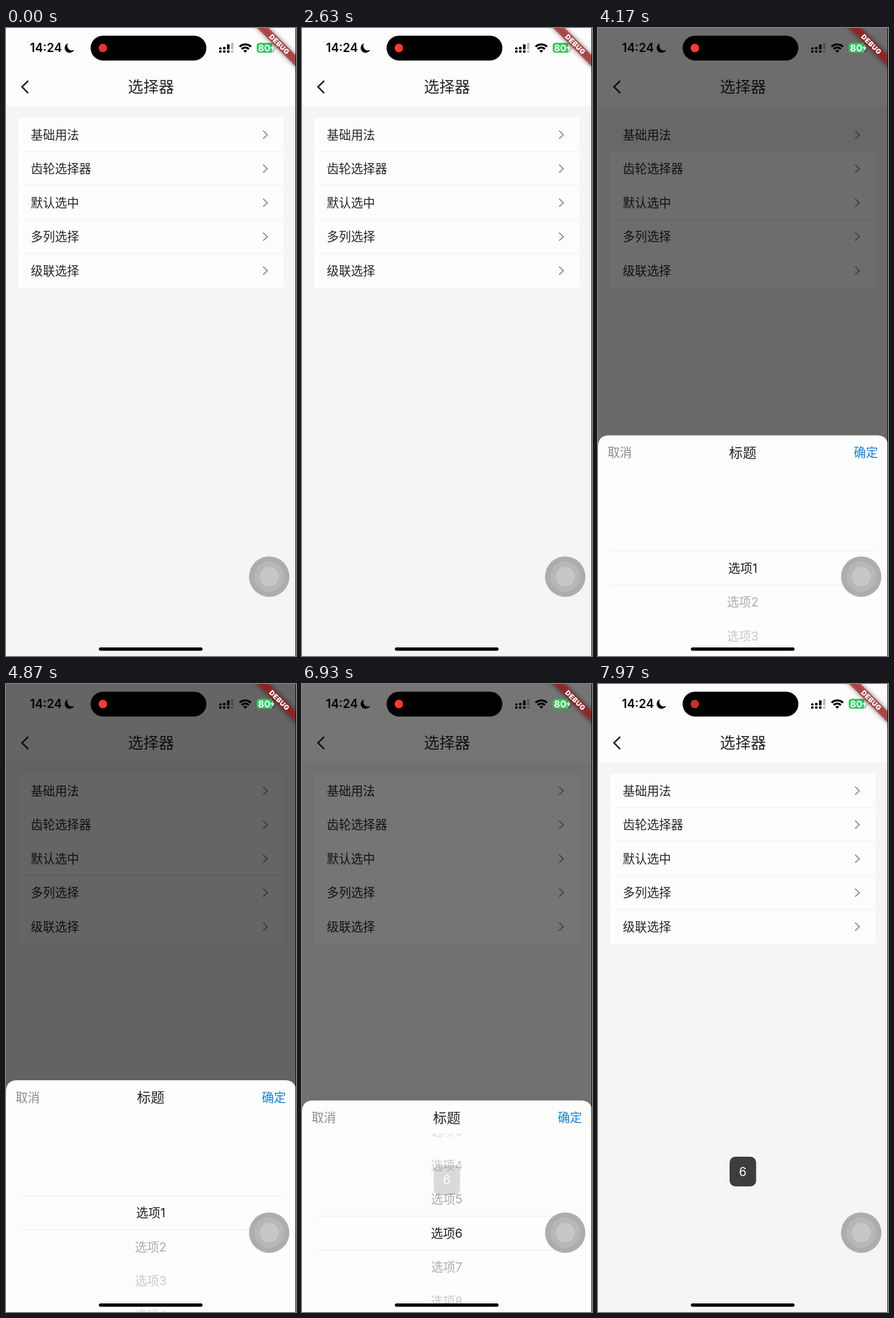
Animation of 509x1100 px, one loop 8000 ms. Source, as an HTML page:

```html
<!DOCTYPE html>
<html lang="zh-CN">
<head>
<meta charset="utf-8">
<title>选择器</title>
<style>
  html, body { margin: 0; width: 100%; height: 100%; overflow: hidden; background: #f4f5f6; }
  svg { display: block; width: 509px; height: 1100px; }
  text { font-family: Inter, "Noto Sans CJK SC", "Noto Sans CJK", sans-serif; font-size: 21.2px; fill: #262626; }
  .mid { text-anchor: middle; }
  .end { text-anchor: end; }
  .line { stroke: #ededf2; stroke-width: 1.2; }
  .chevron { fill: none; stroke: #8a8a96; stroke-width: 1.8; }
</style>
</head>
<body>
<svg viewBox="0 0 509 1100">
  <defs>
    <clipPath id="listClip"><rect y="58" width="509" height="348"/></clipPath>
    <filter id="soft" x="-20%" y="-200%" width="140%" height="500%"><feGaussianBlur stdDeviation="4.4"/></filter>
  </defs>

  <g id="page">
    <rect width="509" height="1100" fill="#f4f5f6"/>
    <rect width="509" height="136.5" fill="#fdfdfd"/>
    <path d="M39 92.5L28 103L39 114" fill="none" stroke="#1c1c1c" stroke-width="2.6"/>
    <text class="mid" x="254.5" y="113" style="font-size:27px">选择器</text>
    <rect x="22" y="157.5" width="465" height="297.5" fill="#fdfdfd"/>
    <rect id="pressed" x="22" y="157.5" width="465" height="59.5" fill="#f2f2f4"/>
    <g id="rows"></g>
  </g>

  <rect id="barrier" width="509" height="1100"/>

  <g id="sheet">
    <path d="M0 420V20Q0 0 20 0H489Q509 0 509 20V420Z" fill="#fdfdfc"/>
    <text x="17" y="37.8" style="fill:#8c8c8c">取消</text>
    <text class="mid" x="254" y="39.2" style="font-size:24.3px">标题</text>
    <text class="end" x="491.5" y="37.8" style="fill:#1280df">确定</text>
    <path class="line" d="M23 202.5H486M23 262H486"/>
    <g id="list" clip-path="url(#listClip)"></g>
  </g>

  <g id="toast">
    <rect x="231" y="828" width="46.5" height="52" rx="10" fill-opacity=".75"/>
    <text class="mid" x="254" y="861.5" style="fill:#fff">6</text>
  </g>

  <g id="status">
    <text x="42" y="42.4" style="font-weight:600;font-size:21px;fill:#000">14:24</text>
    <path d="M109 26.7A8.6 8.6 0 1 0 119.6 38.2A8 8 0 0 1 109 26.7Z"/>
    <rect x="148.5" y="13.4" width="203.2" height="43.5" rx="21.7"/>
    <circle id="dot" cx="170" cy="35" r="7.4" fill="#ff3b30"/>
    <g id="signal"></g>
    <g fill="none" stroke="#000" stroke-width="3.6">
      <path d="M410 32.8A14.2 14.2 0 0 1 430 32.8"/>
      <path d="M413.8 36.9A8.6 8.6 0 0 1 426.2 36.9"/>
    </g>
    <path d="M420 43.3L416.6 39.8A4.8 4.8 0 0 1 423.4 39.8Z"/>
    <rect x="440" y="26" width="32" height="17.3" rx="5.5" fill="#000" opacity=".22"/>
    <path d="M467 26H445.5Q440 26 440 31.5V37.8Q440 43.3 445.5 43.3H467Z" fill="#34c759"/>
    <path d="M473.5 32V37.5Q475.5 36.5 475.5 34.7T473.5 32Z" opacity=".22"/>
    <text x="442.3" y="40.7" style="font-weight:700;font-size:16.6px;fill:#fff">80</text>
    <path d="M469.5 28.5L464 35.8H467.3L466 41.5L471.7 33.8H468.3Z" fill="#fff"/>
  </g>

  <g transform="translate(508 0) rotate(45)">
    <rect x="-90" y="33.2" width="180" height="14.2" opacity=".5" filter="url(#soft)"/>
    <rect x="-90" y="33.2" width="180" height="14.2" fill="#b71c1c" fill-opacity=".63"/>
    <text class="mid" x="0.3" y="44.5" style="font-weight:900;font-size:12px;letter-spacing:.5px;fill:#fff">DEBUG</text>
  </g>

  <circle cx="462" cy="961" r="35.5" fill="#adadad"/>
  <circle cx="462" cy="961" r="26.5" fill="#b7b7b7"/>
  <circle cx="462" cy="961" r="17" fill="#c7c7c7"/>
  <rect x="163" y="1084.9" width="182" height="5.8" rx="2.9"/>
  <rect x="508" width="1" height="1100"/>
</svg>

<script>
const LOOP = 8000, ROW = 59.5, SHEET_TOP = 694, SHEET_H = 406;
const OPEN = [3993, 250], CLOSE = [6855, 200], SCROLL = [5150, 1100], TOAST = [6895, 200];
const SHADES = ['#1f1f1f', '#ababab', '#c8c8c8', '#dedede'];
const $ = id => document.getElementById(id);

function add(parent, tag, attrs, label) {
  const el = document.createElementNS('http://www.w3.org/2000/svg', tag);
  for (const key in attrs) el.setAttribute(key, attrs[key]);
  if (label) el.textContent = label;
  return parent.appendChild(el);
}

['基础用法', '齿轮选择器', '默认选中', '多列选择', '级联选择'].forEach((label, i) => {
  const y = 187 + i * ROW;
  add($('rows'), 'text', { x: 43.5, y: y + 7.8 }, label);
  add($('rows'), 'path', { class: 'chevron', d: `M451.3 ${y - 7}L458.7 ${y}L451.3 ${y + 7}` });
  if (i) add($('rows'), 'path', { class: 'line', d: `M28 ${y - 30}H487` });
});

[34, 33, 28.5, 26].forEach((top, i) => {
  const style = { x: 374 + i * 7, width: 4.4, rx: 1.2, opacity: i < 3 ? 1 : .25 };
  add($('signal'), 'rect', { ...style, y: top, height: 37.5 - top });
  add($('signal'), 'rect', { ...style, y: 39.3, height: 4 });
});

const options = Array.from({ length: 10 }, (_, i) =>
  add($('list'), 'text', { class: 'mid', x: 254 }, '选项' + (i + 1)));

const clamp = v => Math.min(1, Math.max(0, v));
const part = (t, [start, length]) => clamp((t - start) / length);

function bezier(x1, y1, x2, y2) {
  const at = (a, b, s) => 3 * a * s * (1 - s) ** 2 + 3 * b * s * s * (1 - s) + s ** 3;
  return x => {
    let lo = 0, hi = 1;
    for (let i = 0; i < 24; i++) {
      const m = (lo + hi) / 2;
      if (at(x1, x2, m) < x) lo = m; else hi = m;
    }
    return at(y1, y2, (lo + hi) / 2);
  };
}
const decelerate = bezier(0, 0, .2, 1);
const ease = bezier(.25, .1, .25, 1);

function draw(t) {
  const shown = part(t, OPEN) - part(t, CLOSE);
  const top = SHEET_TOP + SHEET_H * (1 - decelerate(shown));
  $('sheet').setAttribute('transform', `translate(0 ${top})`);
  $('sheet').style.display = shown > 0 ? '' : 'none';
  $('barrier').setAttribute('opacity', shown > 0 ? .6 * ease(shown) : 0);
  $('pressed').setAttribute('opacity', part(t, [3880, 60]) - part(t, [4200, 100]));

  const pos = 5 * (1 - (1 - part(t, SCROLL)) ** 2.15);
  options.forEach((el, i) => {
    const far = Math.min(3, Math.abs(i - Math.round(pos)));
    el.setAttribute('y', 240.3 + (i - pos) * ROW);
    el.style.fill = SHADES[far];
  });

  const pop = part(t, TOAST);
  $('toast').setAttribute('opacity', pop);
  $('toast').setAttribute('transform', `translate(0 ${18 * (1 - pop)})`);
  $('dot').setAttribute('opacity', .9 + .1 * part(t, [0, 900]) - .21 * part(t, [7500, 470]));
}

const begin = performance.now();
function tick() {
  draw((performance.now() - begin) % LOOP);
  requestAnimationFrame(tick);
}
tick();
</script>
</body>
</html>
```
